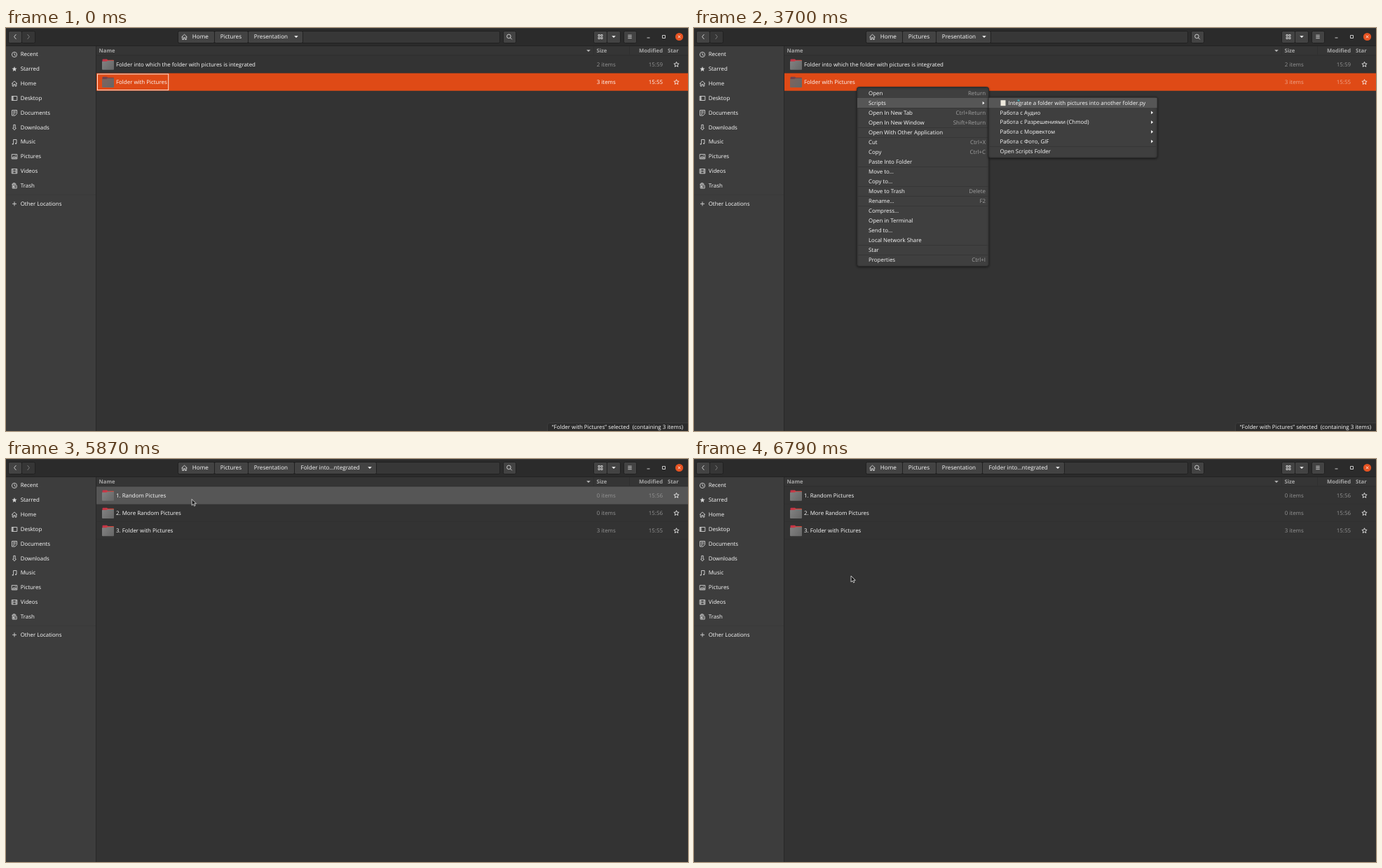
Recreate the animation shown at these times as an HTML page with a canvas. Size 973x576 px, loop 6830 ms.

```html
<!DOCTYPE html>
<html lang="en">
<head>
<meta charset="utf-8">
<title>File manager</title>
<style>
html, body { margin: 0; width: 100%; height: 100%; overflow: hidden; background: #333; }
canvas { display: block; }
</style>
</head>
<body>
<canvas id="stage" width="973" height="576"></canvas>
<script>
const ctx = document.getElementById('stage').getContext('2d');
const LOOP = 6830;
const ORANGE = '#df4a16', LIGHT = '#fbfbfb', DIM = '#949494';
const BODY_FONT = '7.92px "Open Sans", "Noto Sans", sans-serif';
const PATH_FONT = '8.15px "Open Sans", "Noto Sans", sans-serif';
const COLUMN_FONT = 'bold 7.7px "Open Sans", sans-serif';
const LONG_NAME = 'Folder into which the folder with pictures is integrated';
const ROW_TOP = 39.45, ROW_HEIGHT = 25.15;

function starPath(r) {
  let d = '';
  for (let i = 0; i < 10; i++) {
    const a = i * Math.PI / 5 - Math.PI / 2, k = i % 2 ? r * 0.45 : r;
    d += (i ? 'L' : 'M') + k * Math.cos(a) + ' ' + k * Math.sin(a);
  }
  return d + 'Z';
}

const ICONS = {
  recent: 'M3.6 0A3.6 3.6 0 1 1 -3.6 0A3.6 3.6 0 1 1 3.6 0M0 -2.2V.3L1.8 1.2',
  star: starPath(3.8),
  home: 'M-4 0L0 -3.8L4 0M-2.8 -1V3.5H-1V.8H1V3.5H2.8V-1',
  desktop: 'M-3.8 -3H3.8V3H-3.8ZM-2.6 -3V3M-2 -3V3',
  documents: 'M-3.5 -3.8H3.5V1.2L1 3.8H-3.5ZM-2 -2H2M-2 0H2M-2 2H0',
  downloads: 'M-1.2 -3.8H1.2V1H2.4L0 3.8L-2.4 1H-1.2Z',
  music: 'M-1.4 2.5V-3.5H3V1.7M-3.2 2.6H-1.4M1.2 1.8H3M-3.2 3.2H-1.4M1.2 2.4H3',
  pictures: 'M-3.8 -3.2H3.8V3.2H-3.8ZM-2.6 2L-.6 -.6L.6 .8L1.5 0L2.7 2ZM1 -1.6H2',
  videos: 'M-3.8 -3.2H3.8V3.2H-3.8ZM-2.2 -3.2V3.2M2.2 -3.2V3.2M-2.2 0H2.2',
  trash: 'M-3.6 -2.2H2.6M-2 -2.2V-3.6H1V-2.2M-2.8 -2.2V3.6H3.2V-.4H-.6V3.6M1 1V2.6M-1.6 -.6V2.4',
  plus: 'M-3 0H3M0 -3V3',
  back: 'M1.4 -3.4L-1.4 0L1.4 3.4',
  forward: 'M-1.4 -3.4L1.4 0L-1.4 3.4',
  search: 'M2.2 -.6A2.8 2.8 0 1 1 -3.4 -.6A2.8 2.8 0 1 1 2.2 -.6M1.4 1.4L3.8 3.8',
  grid: 'M-3 -3H-.8V-.8H-3ZM.8 -3H3V-.8H.8ZM-3 .8H-.8V3H-3ZM.8 .8H3V3H.8Z',
  lines: 'M-2.7 -2.2H2.7M-2.7 0H2.7M-2.7 2.2H2.7',
  maximise: 'M-2 -2H2V2H-2Z',
  minimise: 'M-2 1.5H2',
  close: 'M-1.7 -1.7L1.7 1.7M1.7 -1.7L-1.7 1.7',
  caret: 'M-2.8 -1.3H2.8L0 1.6Z',
  arrow: 'M-1.3 -2.3L1.5 0L-1.3 2.3Z',
  folderBack: 'M-8 -5V-6.5Q-8 -7.5 -7 -7.5H-1.5L-.3 -6.4H7.5Q8.5 -6.4 8.5 -5.4V2H-8Z',
  folderFront: 'M-8.5 -4.2H-2L-.6 -5.2H8.5V6.8Q8.5 7.8 7.5 7.8H-7.5Q-8.5 7.8 -8.5 6.8Z',
  cursor: 'M0 0V8.8L2.1 7L3.5 9.8L5 9.1L3.6 6.3H6.3Z'
};
for (const name in ICONS) ICONS[name] = new Path2D(ICONS[name]);

function icon(name, x, y, stroke = '#dcdcdc', fill, width = 0.9) {
  ctx.save();
  ctx.translate(x, y);
  ctx.lineWidth = width;
  if (fill) { ctx.fillStyle = fill; ctx.fill(ICONS[name]); }
  if (stroke) { ctx.strokeStyle = stroke; ctx.stroke(ICONS[name]); }
  ctx.restore();
}

function rect(x, y, w, h, fill) {
  ctx.fillStyle = fill;
  ctx.fillRect(x, y, w, h);
}

function outline(x, y, w, h, color) {
  ctx.lineWidth = 1;
  ctx.strokeStyle = color;
  ctx.strokeRect(x + 0.5, y + 0.5, w - 1, h - 1);
}

function panel(x, y, w, h, radius, fill, border) {
  ctx.beginPath();
  ctx.roundRect(x + 0.5, y + 0.5, w - 1, h - 1, radius);
  ctx.fillStyle = fill;
  ctx.fill();
  ctx.lineWidth = 1;
  ctx.strokeStyle = border;
  ctx.stroke();
}

function disc(x, y, r, fill) {
  ctx.beginPath();
  ctx.arc(x, y, r, 0, 7);
  ctx.fillStyle = fill;
  ctx.fill();
}

// y is the vertical middle of the line
function text(s, x, y, color = LIGHT, align = 'left', font = BODY_FONT) {
  ctx.font = font;
  ctx.textAlign = align;
  ctx.fillStyle = color;
  ctx.fillText(s, x, y + 2.7);
}

function textWidth(s) {
  ctx.font = BODY_FONT;
  return ctx.measureText(s).width;
}

function folderGradient(from, to) {
  const gradient = ctx.createLinearGradient(-8, -6, 8, 6);
  gradient.addColorStop(0, from);
  gradient.addColorStop(1, to);
  return gradient;
}

function button(x, w, fill = '#434343') {
  panel(x, 4, w, 18, 2, fill, '#212121');
}

function headerBar(inside) {
  rect(0, 0, 973, 26, '#2b2b2b');
  rect(0, 0, 973, 1, '#383838');
  rect(0, 25, 973, 1, '#232323');
  button(3, 20);
  button(22, 20, '#363636');
  icon('back', 13, 12.5);
  icon('forward', 32, 12.5, '#858585');

  button(245, 460, '#373737');
  const edges = inside ? [245, 297, 345, 411, 528] : [245, 297, 345, 423];
  edges.slice(1).forEach((end, i) => button(edges[i], end - edges[i] + 1));
  icon('home', 254.5, 13);
  const crumb = (label, x) => text(label, x, 12.5, LIGHT, 'left', PATH_FONT);
  crumb('Home', 265.8);
  crumb('Pictures', 305.8);
  crumb('Presentation', 353.8);
  if (inside) crumb('Folder into…ntegrated', 420.5);
  icon('caret', inside ? 519 : 414, 12.5, null, LIGHT);

  button(709, 19);
  icon('search', 718, 12.5);
  button(838, 20);
  icon('grid', 848, 12.5);
  button(857, 20);
  icon('caret', 867, 12.5, null, LIGHT);
  button(881, 19);
  icon('lines', 890, 12.5);
  icon('minimise', 916.5, 12.5);
  icon('maximise', 938.5, 12.5);
  disc(960.5, 12.5, 5.6, '#e65322');
  icon('close', 960.5, 12.5, '#fff');
}

function sidebar() {
  rect(0, 26, 128, 550, '#3d3d3d');
  rect(128, 26, 1, 550, '#282828');
  ['Recent', 'Starred', 'Home', 'Desktop', 'Documents', 'Downloads', 'Music', 'Pictures', 'Videos', 'Trash']
    .forEach((label, i) => {
      const y = 37.7 + 20.83 * i, starred = label === 'Starred';
      icon(starred ? 'star' : label.toLowerCase(), 12, y + 0.3, starred ? null : '#d4d4d4', starred && '#d4d4d4');
      text(label, 20.7, y);
    });
  rect(0, 238, 128, 1, '#393939');
  icon('plus', 12, 251.3, '#d4d4d4');
  text('Other Locations', 20.7, 251);
}

function columns() {
  rect(129, 26, 844, 13, '#353535');
  rect(129, 38.5, 844, 1, '#2f2f2f');
  rect(838, 26, 1, 13, '#303030');
  rect(889, 26, 1, 13, '#303030');
  const heading = (label, x, align) => text(label, x, 32.5, '#a5a5a5', align, COLUMN_FONT);
  heading('Name', 132.5);
  icon('caret', 831, 32.5, null, '#bdbdbd');
  heading('Size', 842.5);
  heading('Modified', 937, 'right');
  heading('Star', 944);
}

// state: '', 'hover', 'focused' or 'selected'
function row(i, name, size, time, state = '') {
  const top = ROW_TOP + ROW_HEIGHT * i, mid = top + 12.6;
  const selected = state === 'focused' || state === 'selected';
  if (selected) rect(129, top, 844, ROW_HEIGHT, ORANGE);
  else if (state === 'hover') rect(129, top, 844, ROW_HEIGHT, '#565656');
  else rect(129, top + ROW_HEIGHT - 1, 844, 1, '#303030');
  icon('folderBack', 145.5, mid, null, selected ? folderGradient('#6c4250', '#8c4a3c') : folderGradient('#c2324a', '#e2552c'));
  icon('folderFront', 145.5, mid, null, selected ? folderGradient('#80645c', '#666') : folderGradient('#828282', '#686868'));
  text(name, 157, mid - 0.2);
  const info = { focused: '#fff', selected: '#eda78f' }[state] || DIM;
  text(size, 842.8, mid - 0.2, info);
  text(time, 937, mid - 0.2, info, 'right');
  icon('star', 956.5, mid + 0.2, LIGHT, null, 0.8);
  if (state === 'focused') outline(130, top + 0.8, textWidth(name) + 29.5, ROW_HEIGHT - 1.4, '#fbe0d5');
}

function status(name, count) {
  const s = `“${name}” selected  (containing ${count} items)`;
  const left = Math.round(966 - textWidth(s) - 7);
  panel(left, 564, 980 - left, 20, 3, '#2c2c2c', '#3c3c3c');
  text(s, 966, 570, LIGHT, 'right');
}

// '|' before a label puts a separator above it
const MENU = [
  ['Open', 'Return'], ['Scripts', '>'], ['|Open In New Tab', 'Ctrl+Return'],
  ['Open In New Window', 'Shift+Return'], ['|Open With Other Application'],
  ['|Cut', 'Ctrl+X'], ['Copy', 'Ctrl+C'], ['Paste Into Folder'], ['|Move to…'], ['Copy to…'],
  ['|Move to Trash', 'Delete'], ['|Rename…', 'F2'], ['|Compress…'], ['Open in Terminal'],
  ['Send to…'], ['Local Network Share'], ['|Star'], ['|Properties', 'Ctrl+I']
];
const SUBMENU = [
  ['Integrate a folder with pictures into another folder.py'], ['Работа с Аудио', '>'],
  ['Работа с Разрешениями (Chmod)', '>'], ['Работа с Морвектом', '>'],
  ['Работа с Фото, GIF', '>'], ['|Open Scripts Folder']
];

function menu(items, x, y, w, h, firstY, active) {
  ctx.save();
  ctx.shadowColor = 'rgba(0,0,0,.45)';
  ctx.shadowBlur = 3;
  ctx.shadowOffsetY = 1;
  panel(x, y, w, h, 3, '#3f3f3f', '#2a2a2a');
  ctx.restore();
  let mid = firstY;
  items.forEach(([label, hint], i) => {
    if (i) mid += 13.72;
    if (label[0] === '|') {
      mid += 0.5;
      rect(x + 1, Math.round(mid - 7.4), w - 2, 1, '#363636');
    }
    if (i === active) rect(x + 1, Math.round(mid - 7), w - 2, 14, '#565656');
    const script = label.endsWith('.py');
    if (script) rect(437.5, mid - 4, 7, 8, '#ece8dc');
    text(label.replace('|', ''), x + (script ? 29 : 17), mid);
    if (hint === '>') icon('arrow', x + w - 8, mid, null, LIGHT);
    else if (hint) text(hint, x + w - 5, mid, '#a0a0a0', 'right');
  });
}

function outerFolder(t) {
  const menuOpen = t >= 1690 && t < 3780;
  const moved = t >= 4020, chosen = t >= 4200;
  row(0, LONG_NAME, '2 items', '15:59', chosen ? 'focused' : '');
  if (!moved) row(1, 'Folder with Pictures', '3 items', '15:55', menuOpen ? 'selected' : 'focused');
  if (chosen) status(LONG_NAME, 2);
  else if (!moved) status('Folder with Pictures', 3);
  if (!menuOpen) return;

  const ripple = 1 - (t - 1690) / 260;
  if (ripple > 0) disc(231.5, 84, 5.5, `rgba(70,150,190,${0.9 * ripple})`);
  menu(MENU, 232, 84, 189, 257, 93.6, t < 2000 ? -1 : t < 2120 ? 0 : 1);
  if (t >= 2450) menu(SUBMENU, 419.5, 98, 242, 88, 107.2, t < 2950 ? -1 : 0);
  if (t >= 3700) disc(463, 103.5, 1.6, '#3f9ea6');
}

const POINTER = [
  [5870, 266, 57], [5930, 210, 84], [6010, 135.5, 118], [6110, 129, 138], [6300, 175, 128],
  [6520, 232, 104], [6660, 238, 135], [6790, 224, 167]
];

function pointerAt(t) {
  const next = POINTER.findIndex(p => p[0] > t);
  if (next === 0) return POINTER[0].slice(1);
  if (next < 0) return POINTER[POINTER.length - 1].slice(1);
  const [t0, x0, y0] = POINTER[next - 1], [t1, x1, y1] = POINTER[next];
  const k = (t - t0) / (t1 - t0);
  return [x0 + (x1 - x0) * k, y0 + (y1 - y0) * k];
}

function innerFolder(t) {
  const [x, y] = pointerAt(t);
  if (t < 5570) {
    outline(129, ROW_TOP, 844, 576 - ROW_TOP, '#b0623a');
    status(LONG_NAME, 2);
  } else {
    // the hover highlight trails the pointer slightly
    const hovered = Math.floor((pointerAt(t - 40)[1] - ROW_TOP) / ROW_HEIGHT);
    [['1. Random Pictures', '0 items', '15:56'],
     ['2. More Random Pictures', '0 items', '15:56'],
     ['3. Folder with Pictures', '3 items', '15:55']]
      .forEach((item, i) => row(i, ...item, i === hovered ? 'hover' : ''));
  }
  icon('cursor', x, y, '#e8e8e8', '#1a1a1a', 0.8);
  if (t < 5650) disc(269.5, 65.2, 3.3, '#e2f3f4');
}

function draw(now) {
  const t = now % LOOP, inside = t >= 5490;
  ctx.textRendering = 'geometricPrecision';
  rect(0, 0, 973, 576, '#333');
  headerBar(inside);
  sidebar();
  columns();
  (inside ? innerFolder : outerFolder)(t);
}

const start = performance.now();
function tick() {
  draw(performance.now() - start);
  requestAnimationFrame(tick);
}
tick();
</script>
</body>
</html>
```
